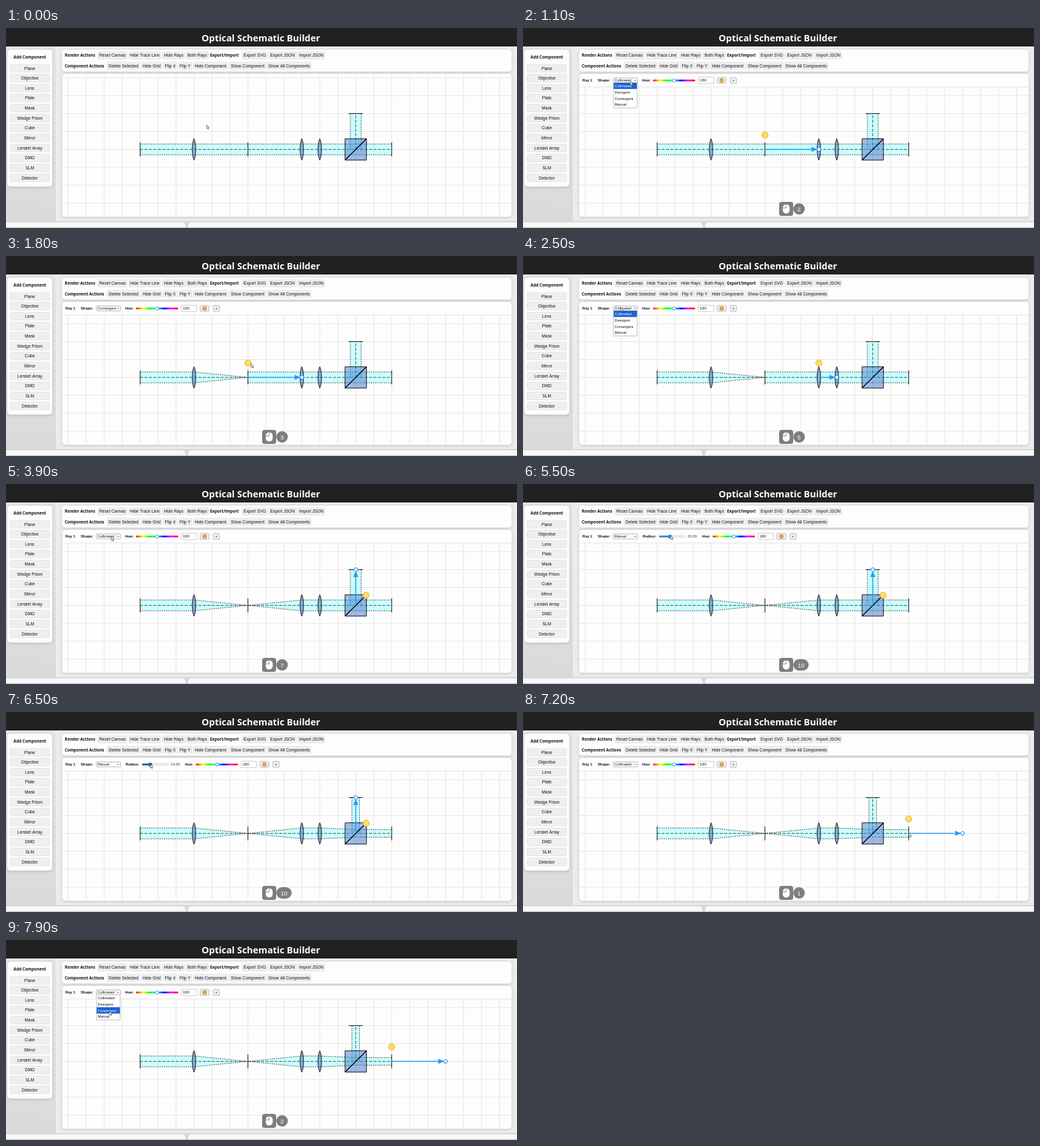
Recreate the animation shown at these times as an HTML page with a canvas. Size 800 by 314 pixels, loop 8000 ms.

```html
<!DOCTYPE html>
<html lang="en">
<head>
<meta charset="utf-8">
<title>Optical Schematic Builder</title>
<style>
html, body { margin: 0; width: 100%; height: 100%; overflow: hidden; background: #e6e6e6; }
canvas { display: block; width: 800px; height: 314px; }
</style>
</head>
<body>
<canvas id="stage" width="800" height="314"></canvas>
<script>
const ctx = document.getElementById('stage').getContext('2d');
const LOOP = 8000, STEP = 100;
const ARIAL = '"Liberation Sans", Arial, sans-serif';
const HUMAN = '"Open Sans", "Noto Sans", sans-serif';
const GRID = 28.13, AXIS = 190.6, BEAM = 8.5;
const gridX = n => 210 + n * GRID;
const SHAPES = ['Collimated', 'Divergent', 'Convergent', 'Manual'];

// Components by grid column; the cube folds its beam upwards.
const PARTS = {
  plane: { x: gridX(6), tip: [gridX(9), AXIS], knob: [gridX(6), 168] },
  lens: { x: gridX(9), tip: [gridX(10), AXIS], knob: [gridX(9), 168] },
  cube: { x: gridX(12), tip: [gridX(12), 134.4], knob: [563.7, 174.6] },
  end: { x: gridX(14), tip: [gridX(17), AXIS], knob: [gridX(14), 168] }
};

// time, x, y
const CURSOR = [
  [0, 314, 152], [100, 314, 152], [400, 379, 188], [500, 379, 188],
  [900, 168, 84], [1100, 168, 84], [1500, 157, 109], [1600, 157, 109],
  [1900, 463, 190], [2000, 463, 190], [2400, 153, 81], [2500, 153, 81],
  [2800, 157, 99], [2900, 157, 99], [3300, 548, 190], [3400, 548, 190],
  [3800, 165, 83], [4100, 165, 83], [4700, 157, 119], [4900, 157, 119],
  [5300, 231, 81], [5500, 231, 81], [6400, 226, 82], [6800, 226, 82],
  [7100, 604, 190], [7200, 604, 190], [7600, 163, 83], [7900, 162, 112]
];

// time, action, argument, click counter
const CLICKS = [
  [500, 'select', 'plane', 1], [1000, 'open', '', 2], [1600, 'choose', 'Convergent', 3],
  [2000, 'select', 'lens', 4], [2400, 'open', '', 5], [2900, 'choose', 'Divergent', 6],
  [3400, 'select', 'cube', 7], [4100, 'open', '', 8], [4900, 'choose', 'Manual', 9],
  [5400, 'drag', '', 10], [7200, 'select', 'end', 1], [7600, 'open', '', 2]
];

const clamp = (v, lo, hi) => Math.min(hi, Math.max(lo, v));
const ease = u => u * u * (3 - 2 * u);

function cursorAt(t) {
  const i = CURSOR.findIndex(k => k[0] > t);
  if (i < 0) return CURSOR[CURSOR.length - 1].slice(1);
  const [t0, x0, y0] = CURSOR[i - 1], [t1, x1, y1] = CURSOR[i];
  const u = ease((t - t0) / (t1 - t0));
  return [x0 + (x1 - x0) * u, y0 + (y1 - y0) * u];
}

function stateAt(t) {
  const s = { selected: null, open: false, drag: false, count: 0, shapes: {}, cursor: cursorAt(t) };
  for (const [time, action, arg, count] of CLICKS) {
    if (time > t) break;
    s.count = count;
    s.open = action === 'open';
    s.drag = action === 'drag';
    if (action === 'select') s.selected = arg;
    if (action === 'choose') s.shapes[s.selected] = arg;
  }
  s.radius = Math.round(20 - 6 * ease(clamp((t - 5500) / 900, 0, 1)));
  s.dragging = s.drag && t > 5500 && t < 6800;
  return s;
}

function text(str, x, y, size, { font = ARIAL, bold, color = '#111', align = 'left' } = {}) {
  ctx.font = `${bold ? 'bold ' : ''}${size}px ${font}`;
  ctx.fillStyle = color;
  ctx.textAlign = align;
  ctx.textBaseline = 'alphabetic';
  ctx.fillText(str, x, y + size * 0.35);
}

function box(x, y, w, h, r, fill, stroke, lw = 0.6) {
  ctx.beginPath();
  ctx.roundRect(x, y, w, h, r);
  if (fill) { ctx.fillStyle = fill; ctx.fill(); }
  if (stroke) { ctx.strokeStyle = stroke; ctx.lineWidth = lw; ctx.stroke(); }
}

function card(x, y, w, h, r = 5) {
  ctx.save();
  ctx.shadowColor = 'rgba(0,0,0,.18)';
  ctx.shadowBlur = 4;
  ctx.shadowOffsetY = 1;
  box(x, y, w, h, r, '#fdfdfd');
  ctx.restore();
}

function disc(x, y, r, fill, stroke, lw = 1) {
  ctx.beginPath();
  ctx.arc(x, y, r, 0, 7);
  ctx.fillStyle = fill;
  ctx.fill();
  if (stroke) { ctx.strokeStyle = stroke; ctx.lineWidth = lw; ctx.stroke(); }
}

function line(x0, y0, x1, y1, color = '#111', lw = 1, dash = []) {
  ctx.beginPath();
  ctx.setLineDash(dash);
  ctx.moveTo(x0, y0);
  ctx.lineTo(x1, y1);
  ctx.strokeStyle = color;
  ctx.lineWidth = lw;
  ctx.stroke();
  ctx.setLineDash([]);
}

function polygon(points, fill) {
  ctx.beginPath();
  points.forEach(p => ctx.lineTo(...p));
  ctx.closePath();
  ctx.fillStyle = fill;
  ctx.fill();
}

function button(label, x0, x1, y, h = 11) {
  box(x0, y - h / 2, x1 - x0, h, 1.5, '#efefef', '#d8d8d8', 0.6);
  text(label, (x0 + x1) / 2, y, 6.6, { align: 'center' });
}

function drawChrome() {
  ctx.fillStyle = '#ececec';
  ctx.fillRect(0, 0, 800, 314);
  const side = ctx.createLinearGradient(0, 29, 0, 304);
  side.addColorStop(0, '#e6e6e6');
  side.addColorStop(1, '#dadada');
  ctx.fillStyle = side;
  ctx.fillRect(0, 29, 78, 275);
  ctx.fillStyle = '#d6d6d6';
  ctx.fillRect(0, 303, 800, 11);
  box(-6, 305, 287, 20, 5, '#f7f7f7');
  box(285, 305, 525, 20, 5, '#f7f7f7');
  ctx.fillStyle = '#bbb';
  ctx.fillRect(0, 313, 800, 1);

  ctx.fillStyle = '#212121';
  ctx.fillRect(0, 0, 800, 29);
  text('Optical Schematic Builder', 399, 15.5, 14.4, { font: HUMAN, bold: true, color: '#fff', align: 'center' });

  card(2, 34, 70.5, 215);
  text('Add Component', 37.3, 46, 6.35, { font: HUMAN, bold: true, align: 'center' });
  ['Plane', 'Objective', 'Lens', 'Plate', 'Mask', 'Wedge Prism', 'Cube', 'Mirror',
    'Lenslet Array', 'DMD', 'SLM', 'Detector'].forEach((name, i) =>
    button(name, 6.5, 68, 63.2 + i * 15.64, 12));

  card(87.5, 34, 704, 34.5);
  const label = { font: HUMAN, bold: true };
  text('Render Actions', 92, 43, 6.3, label);
  text('Export/Import', 319.5, 43, 6.3, label);
  text('Component Actions', 92, 59.3, 6.3, label);
  [['Reset Canvas', 144, 189.5], ['Hide Trace Line', 192.5, 242], ['Hide Rays', 245, 280],
    ['Both Rays', 282, 317], ['Export SVG', 370, 409], ['Export JSON', 411, 454.5],
    ['Import JSON', 457, 499]].forEach(b => button(...b, 43));
  [['Delete Selected', 158.5, 209.5], ['Hide Grid', 212, 244], ['Flip X', 246.5, 268],
    ['Flip Y', 270, 291], ['Hide Component', 293.5, 347], ['Show Component', 349.5, 407],
    ['Show All Components', 409, 477.5]].forEach(b => button(...b, 59.3));

  card(88, 72, 703.5, 224.5);
}

function drawGrid() {
  for (let x = gridX(-4); x < 791; x += GRID) line(x, 72, x, 296.5, '#e2e2e2', 0.9);
  for (let y = AXIS - 4 * GRID; y < 296; y += GRID) line(88, y, 791.5, y, '#e2e2e2', 0.9);
}

// A beam along the x axis from x0 to x1 with half widths a and b.
function beam(x0, x1, a, b) {
  polygon([[x0, -a], [x1, -b], [x1, b], [x0, a]], 'rgba(0,255,255,.2)');
  for (const s of [-1, 1]) line(x0, s * a, x1, s * b, '#222', 0.9, [1.7, 1.7]);
  line(x0, 0, x1, 0, '#222', 0.8, [4.2, 2.8]);
}

function lens(x) {
  ctx.beginPath();
  ctx.moveTo(x, AXIS - 16.8);
  ctx.bezierCurveTo(x + 3.6, AXIS - 9, x + 3.6, AXIS + 9, x, AXIS + 16.8);
  ctx.bezierCurveTo(x - 3.6, AXIS + 9, x - 3.6, AXIS - 9, x, AXIS - 16.8);
  ctx.fillStyle = 'rgba(80,135,205,.6)';
  ctx.fill();
  ctx.strokeStyle = '#111';
  ctx.lineWidth = 1;
  ctx.stroke();
}

function drawOptics(s) {
  const r = BEAM * s.radius / 20;
  ctx.save();
  ctx.translate(0, AXIS);
  beam(gridX(0), gridX(3), BEAM, BEAM);
  beam(gridX(3), gridX(6), BEAM, s.shapes.plane ? 0 : BEAM);
  beam(gridX(6), gridX(9), s.shapes.lens ? 0 : BEAM, BEAM);
  beam(gridX(9), gridX(10), BEAM, BEAM);
  beam(gridX(10), gridX(12), BEAM, r);
  beam(gridX(12), gridX(14), r, r);
  ctx.translate(gridX(12), 0);
  ctx.rotate(-Math.PI / 2);
  beam(0, 2 * GRID, r, r);
  ctx.restore();

  for (const n of [0, 6, 14]) line(gridX(n), AXIS - 11, gridX(n), AXIS + 11);
  line(gridX(12) - 11, 134.4, gridX(12) + 11, 134.4);
  [3, 9, 10].forEach(n => lens(gridX(n)));

  const left = gridX(12) - 16.7, top = AXIS - 16.7;
  const tint = ctx.createLinearGradient(left, top, left + 33.4, top + 33.4);
  tint.addColorStop(0, 'rgba(75,145,215,.56)');
  tint.addColorStop(1, 'rgba(85,125,205,.56)');
  box(left, top, 33.4, 33.4, 0, tint, '#111', 1);
  line(left, top + 33.4, left + 33.4, top, '#000', 1.4);
}

function drawSelection({ x, tip: [tx, ty], knob }) {
  const blue = '#2b99f5';
  const len = Math.hypot(tx - x, ty - AXIS);
  ctx.save();
  ctx.translate(x, AXIS);
  ctx.rotate(Math.atan2(ty - AXIS, tx - x));
  line(0, 0, len - 8, 0, blue, 1.5);
  polygon([[len - 11.5, -4], [len - 2, 0], [len - 11.5, 4]], blue);
  disc(len, 0, 2.8, '#fff', blue, 1.1);
  ctx.restore();
  disc(...knob, 4.9, '#ffdc66', '#dba92c', 0.9);
}

function hueSlider(x) {
  const hues = ctx.createLinearGradient(x, 0, x + 66, 0);
  for (let i = 0; i <= 6; i++) hues.addColorStop(i / 6, `hsl(${i * 60},100%,50%)`);
  box(x, 81, 66, 2.8, 1.4, hues);
  disc(x + 33, 82.4, 2.6, '#fff', '#3a8fb0', 0.9);
}

function radiusSlider(radius, dragging) {
  const color = dragging ? '#1d5fa8' : '#2f8be0';
  const x = 216 + radius * 0.7;
  box(213, 80.9, 41, 2.9, 1.4, '#efefef', '#c4c4c4', 0.5);
  box(213, 80.9, x - 213, 2.9, 1.4, color);
  disc(x, 82.4, 3, color);
}

function drawToolbar(s) {
  const shape = s.shapes[s.selected] || 'Collimated';
  const manual = shape === 'Manual';
  const dx = manual ? 93.5 : 0;
  box(88, 72, 703.5, 20.5, [5, 5, 0, 0], '#fdfdfd');
  line(88, 92.6, 791.5, 92.6, '#dedede', 0.8);
  const label = { bold: true };
  text('Ray 1', 93, 82.3, 5.8, label);
  text('Shape:', 117, 82.3, 5.8, label);
  box(141.3, 78.5, 38.2, 7.6, 1, '#fff', '#888', 0.6);
  text(shape, 143.3, 82.3, 5.6);
  line(174, 81.5, 175.5, 83, '#222', 0.8);
  line(175.5, 83, 177, 81.5, '#222', 0.8);
  if (manual) {
    text('Radius:', 187.3, 82.3, 5.8, label);
    radiusSlider(s.radius, s.dragging);
    text(s.radius.toFixed(2), 258, 82.3, 5.7, { color: '#333' });
  }
  text('Hue:', 186.7 + dx, 82.3, 5.8, label);
  hueSlider(203.5 + dx);
  box(274.3 + dx, 77.3, 24.5, 9.8, 1, '#fff', '#aaa', 0.6);
  text('180', 277 + dx, 82.3, 6);
  box(304 + dx, 77.6, 14, 9.4, 1.5, '#efefef', '#999', 0.6);
  disc(311 + dx, 82.4, 3, '#e9b23a', '#8a6a30', 0.6);
  box(324.2 + dx, 77.6, 10, 9.4, 1.5, '#efefef', '#999', 0.6);
  text('+', 329.2 + dx, 82.2, 6, { align: 'center' });
}

function drawMenu(cursorY) {
  const row = 9.8, active = clamp(Math.floor((cursorY - 86) / row), 0, 3);
  box(141.7, 86, 37, row * 4 + 0.3, 0, '#fff', '#999', 0.6);
  SHAPES.forEach((name, i) => {
    if (i === active) box(142, 86 + i * row, 36.4, row, 0, '#1b62d1');
    text(name, 143.5, 91 + i * row, 5.6, { color: i === active ? '#fff' : '#111' });
  });
}

function drawCounter(n) {
  const gray = '#7e7e7e', w = n > 9 ? 24 : 18;
  box(401, 273, 22, 22, 4, gray);
  box(406.7, 276.7, 10.8, 14.6, 5.2, '#fff');
  line(412, 277, 412, 282.5, gray, 0.9);
  line(407, 282.5, 412, 282.5, gray, 0.9);
  box(423.2, 275, w, 18, 9, gray);
  text(n, 423.2 + w / 2, 284.2, 9.5, { color: '#fff', align: 'center' });
}

function drawCursor([x, y]) {
  ctx.beginPath();
  [[0, 0], [0, 5.8], [1.4, 4.6], [2.4, 6.8], [3.4, 6.3], [2.5, 4.2], [4.2, 4.1]]
    .forEach(([dx, dy]) => ctx.lineTo(x + dx, y + dy));
  ctx.closePath();
  ctx.fillStyle = '#fff';
  ctx.fill();
  ctx.strokeStyle = '#444';
  ctx.lineWidth = 0.7;
  ctx.stroke();
}

function draw(t) {
  const s = stateAt(t);
  drawChrome();
  ctx.save();
  ctx.beginPath();
  ctx.roundRect(88, 72, 703.5, 224.5, 5);
  ctx.clip();
  drawGrid();
  drawOptics(s);
  if (s.selected) {
    drawSelection(PARTS[s.selected]);
    drawToolbar(s);
  }
  ctx.restore();
  if (s.open) drawMenu(s.cursor[1]);
  if (s.count) drawCounter(s.count);
  drawCursor(s.cursor);
}

const start = performance.now();
function tick() {
  const t = (performance.now() - start) % LOOP;
  draw(Math.floor(t / STEP) * STEP);
  requestAnimationFrame(tick);
}
tick();
</script>
</body>
</html>
```
